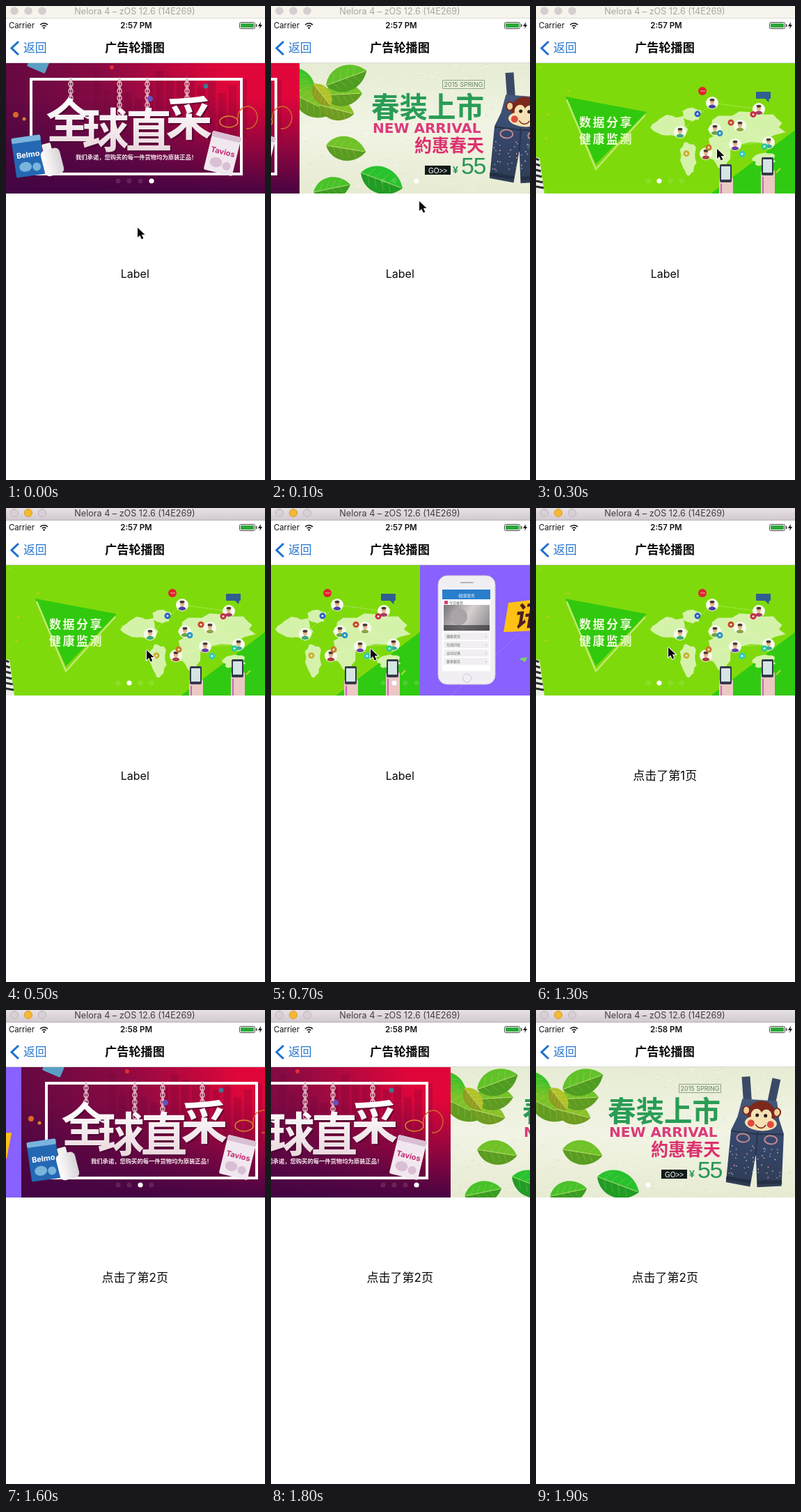
These frames come from a looping animation (372 px wide and 680 px high, 2 s). An HTML page with a canvas:

```html
<!DOCTYPE html>
<html lang="zh-CN">
<head>
<meta charset="utf-8">
<title>广告轮播图</title>
<style>
html, body { margin: 0; width: 100%; height: 100%; overflow: hidden; background: #fff; }
canvas { display: block; }
</style>
</head>
<body>
<canvas id="stage" width="372" height="680"></canvas>
<script>
const ctx = document.getElementById('stage').getContext('2d');
const W = 372, TOP = 82, H = 187, BOTTOM = TOP + H;
const LOOP = 2000, STEP = 100, SLIDE = 120;
const CJK = '"Noto Sans CJK SC", "Noto Sans CJK", sans-serif';
const SANS = 'Inter, ' + CJK;
const ARIAL = '"Liberation Sans", sans-serif';

// Each swipe advances the carousel by one page.
const SWIPES = [20, 150, 671, 780, 880, 1180, 1400, 1509, 1780];
const TAPS = [[800, 3], [1100, 1], [1400, 2]];
const POINTER = [[0, 189, 318], [300, 260, 205], [700, 143, 202], [1000, 190, 200]];

const clamp = v => Math.min(1, Math.max(0, v));
const easeOut = u => 1 - (1 - u) ** 2;
const pageAt = t => SWIPES.reduce((page, s) => page + easeOut(clamp((t - s) / SLIDE)), 3);

function pointerAt(t) {
  const i = POINTER.findIndex(k => k[0] > t);
  if (i < 0) return POINTER[POINTER.length - 1].slice(1);
  const [t0, x0, y0] = POINTER[i - 1], [t1, x1, y1] = POINTER[i];
  const p = (t - t0) / (t1 - t0);
  return [Math.round(x0 + (x1 - x0) * p), Math.round(y0 + (y1 - y0) * p)];
}

function random(seed) {
  return () => (seed = seed * 16807 % 2147483647) / 2147483647;
}

function box(x, y, w, h, color, r = 0) {
  ctx.fillStyle = color;
  ctx.beginPath();
  ctx.roundRect(x, y, w, h, r);
  ctx.fill();
}

function frame(x, y, w, h, color, width = 1, r = 0) {
  ctx.strokeStyle = color;
  ctx.lineWidth = width;
  ctx.beginPath();
  ctx.roundRect(x, y, w, h, r);
  ctx.stroke();
}

function disc(x, y, r, color, ry = r) {
  ctx.fillStyle = color;
  ctx.beginPath();
  ctx.ellipse(x, y, r, ry, 0, 0, 7);
  ctx.fill();
}

function arc(x, y, r, from, to, color, width = 1, ry = r) {
  ctx.strokeStyle = color;
  ctx.lineWidth = width;
  ctx.beginPath();
  ctx.ellipse(x, y, r, ry, 0, from, to);
  ctx.stroke();
}

function trace(points) {
  ctx.beginPath();
  for (let i = 0; i < points.length; i += 2) ctx.lineTo(points[i], points[i + 1]);
}

function poly(points, color) {
  trace(points);
  ctx.fillStyle = color;
  ctx.fill();
}

function line(points, color, width = 1) {
  trace(points);
  ctx.strokeStyle = color;
  ctx.lineWidth = width;
  ctx.stroke();
}

function text(str, x, y, font, color, align = 'left', spacing = 0) {
  ctx.font = font;
  ctx.textAlign = align;
  ctx.letterSpacing = spacing + 'px';
  ctx.fillStyle = color;
  ctx.fillText(str, x, y);
}

function gradient(x0, y0, x1, y1, ...colors) {
  const g = ctx.createLinearGradient(x0, y0, x1, y1);
  colors.forEach((c, i) => g.addColorStop(i / (colors.length - 1), c));
  return g;
}

function at(x, y, angle, draw) {
  ctx.save();
  ctx.translate(x, y);
  ctx.rotate(angle);
  draw();
  ctx.restore();
}

function mirrored(draw) {
  for (const side of [-1, 1]) {
    ctx.save();
    ctx.scale(side, 1);
    draw();
    ctx.restore();
  }
}

function leaf(x, y, length, angle, hue) {
  const bulge = length * .4;
  at(x, y, angle, () => {
    for (const side of [-1, 1]) {
      ctx.fillStyle = `hsl(${hue}, 65%, ${side < 0 ? 46 : 37}%)`;
      ctx.beginPath();
      ctx.moveTo(0, 0);
      ctx.bezierCurveTo(length * .2, side * bulge, length * .75, side * bulge, length, 0);
      ctx.fill();
    }
    line([0, 0, length * .95, 0], 'rgba(225,240,140,.6)');
    for (let s = length / 6; s < length * .75; s += length / 6) {
      line([s + 7, -bulge * .5, s, 0, s + 7, bulge * .5], 'rgba(225,240,140,.3)', .7);
    }
  });
}

function spring() {
  box(0, TOP, W, H, gradient(0, TOP, 0, BOTTOM, '#e6ecd3', '#f1f4e4', '#e7ebd2'));
  const rnd = random(71);
  for (let i = 0; i < 260; i++) {
    box(rnd() * W, TOP + rnd() * H, 1 + rnd() * 6, 1, i % 2 ? 'rgba(190,195,145,.25)' : 'rgba(255,255,250,.5)');
  }
  for (let i = 0; i < 4; i++) leaf(-8, 88 + i * 13, 62, 1.2 - i * .25, 112 - i * 8);
  for (let i = 0; i < 3; i++) leaf(28 + i * 5, 142 - i * 14, 52 + i * 5, .25 - i * .3, 82 + i * 8);
  leaf(20, 112, 40, .9, 66);
  leaf(38, 200, 58, .16, 92);
  leaf(88, 239, 64, .36, 122);
  leaf(20, 267, 54, -.2, 108);

  frame(205.5, 106.5, 60, 12, '#8ba58b');
  text('2015 SPRING', 235.5, 116, '9px Inter, sans-serif', '#668667', 'center');
  text('春装上市', 103, 160, '900 40.5px ' + CJK, '#2a9c56');
  text('NEW ARRIVAL', 105, 182, 'bold 20px "DejaVu Sans", sans-serif', '#dc3a7a');
  text('約惠春天', 165, 209, '900 25px ' + CJK, '#dc316f');
  box(180, 229, 37, 13, '#111b18');
  text('GO>>', 198.5, 239.5, '10px ' + ARIAL, '#fff', 'center');
  text('¥', 220, 240, 'bold 14px ' + ARIAL, '#299557');
  text('55', 232, 241, '34px ' + ARIAL, '#299557', 'left', -1.5);
  at(318, 175, .07, overalls);
}

function overalls() {
  const rnd = random(19);
  mirrored(() => {
    line([22, -78, 17, -42], '#3a4a66', 12);
    poly([0, -46, 25, -46, 30, -20, 38, 0, 40, 75, 5, 79, 0, 32], gradient(0, -46, 0, 79, '#44587a', '#35466a', '#2f3c54'));
    line([0, 3, 37, 1], '#26354a', 2);
    line([5, 72, 40, 69], '#232f44', 5);
    arc(20, 10, 9, 0, 7, '#c48a91', 2, 6);
    for (let i = 0; i < 24; i++) disc(3 + rnd() * 34, 20 + rnd() * 46, .9, i % 3 ? '#8fa3bc' : '#e6a0aa');
  });
  line([0, 0, 0, 34], '#26354a', 2);
  at(4, -23, 0, monkey);
}

function monkey() {
  disc(0, -3, 20, '#7d281d', 19);
  disc(0, 10, 23, '#f5e1b3', 11);
  mirrored(() => {
    disc(22, -7, 6, '#7d281d', 7);
    disc(22, -7, 4, '#efd09a', 5);
    disc(7, -1, 8, '#f5e1b3', 9);
    disc(14, 11, 5, '#df4b40');
    disc(6, -1, 2.5, '#241b1b');
  });
  arc(0, 9, 8, .4, 2.7, '#7d281d', 1.5);
}

// A ragged ellipse standing in for a landmass.
function land(x, y, rx, ry, seed) {
  const rnd = random(seed), points = [];
  for (let a = 0; a < 6.28; a += .3) {
    const k = .8 + rnd() * .35;
    points.push(x + Math.cos(a) * rx * k, y + Math.sin(a) * ry * k);
  }
  poly(points, '#d5f2ab');
}

function avatar(x, y, r, coat) {
  disc(x, y, r, '#f6fbea');
  ctx.save();
  ctx.beginPath();
  ctx.arc(x, y, r - 1, 0, 7);
  ctx.clip();
  disc(x, y + r * .85, r * .65, coat, r * .6);
  disc(x, y - r * .2, r * .35, '#e7b58f', r * .42);
  disc(x, y - r * .48, r * .38, '#4a3a34', r * .22);
  ctx.restore();
}

function handset(x, y) {
  box(x - 1, y + 18, 20, BOTTOM - y, '#ecc8c4', 4);
  line([x + 2, y + 28, x + 2, BOTTOM], '#cc64c0', 2);
  box(x, y, 17, 26, '#353a4c', 2);
  box(x + 2, y + 3, 13, 19, '#d5e5e4');
}

function green() {
  box(0, TOP, W, H, '#7fda0c');
  poly([250, 270, 372, 178, 372, 270], '#31ca12');
  poly([42, 130, 159, 152, 86, 227], '#31c90e');
  line([44, 134, 86, 234, 157, 156], '#bfea73', 2.5);
  ['数据分享', '健康监测'].forEach((row, i) =>
    text(row, 62, 173 + i * 24, 'bold 17px ' + CJK, '#f1fbdc', 'left', 2.5));

  land(193, 172, 26, 16, 5);
  land(224, 155, 15, 10, 8);
  land(219, 218, 12, 25, 12);
  land(304, 174, 56, 23, 20);
  land(265, 204, 18, 29, 31);
  land(328, 220, 16, 10, 44);

  const people = [[207, 181], [253, 139], [320, 148], [293, 172], [334, 196], [286, 199], [244, 212], [257, 177]];
  ctx.setLineDash([1, 2]);
  line(people.flat(), '#eefacf');
  ctx.setLineDash([]);
  people.forEach(([x, y], i) => avatar(x, y, 9, `hsl(${i * 95 + 150}, 45%, 45%)`));
  for (let i = 0; i < 8; i++) {
    const x = 216 + i * 16, y = 184 + 30 * Math.cos(i * 2.5 + .4);
    disc(x, y, 4.5, `hsl(${i * 170 + 50}, 65%, 48%)`);
    disc(x, y, 1.5, '#e8eddb');
  }
  disc(239, 122, 6, '#dd2430');
  line([236, 122, 243, 122], '#ffb4a5');
  box(316, 123, 21, 10, '#315e91', 1);
  poly([329, 133, 335, 133, 334, 138], '#315e91');
  handset(264, 227);
  handset(324, 217);

  poly([0, 217, 5, 218, 12, 269, 0, 269], '#eeeee9');
  for (let y = 219; y < 267; y += 8) line([0, y, 4 + (y - 217) / 6, y + 2], '#252d2a', 3);
  const rnd = random(7);
  for (let i = 0; i < 4; i++) disc(5 + rnd() * 45, 88 + i * 34, 1.2, '#d5c92d');
  line([345, 239, 351, 233], '#c0d72c', 2);
}

function violet() {
  box(0, TOP, W, H, '#8861ff');
  ctx.setLineDash([2, 2]);
  line([45, 269, 145, 178], '#ad91ff');
  ctx.setLineDash([]);

  box(26, 97, 82, 156, '#f2eff4', 13);
  frame(26, 97, 82, 156, '#cbc5d5', 1, 13);
  box(58, 106, 19, 2, '#b7b2bb', 1);
  arc(67.5, 244, 6, 0, 7, '#c7c2ca');
  box(32, 117, 69, 117, '#fff');
  box(32, 117, 69, 14, '#287ecb');
  text('健康服务', 67, 128, '6px ' + CJK, '#e2f0ff', 'center');
  box(35, 133, 5, 5, '#df3d76');
  text('今日推荐', 42, 138, '5px ' + CJK, '#666');
  box(34, 139, 66, 37, gradient(34, 139, 100, 176, '#77747c', '#d6d0cf', '#88848a'));
  disc(56, 156, 12, '#aaa4a8');
  box(34, 168, 66, 8, 'rgba(50,48,54,.65)');
  ['健康资讯', '在线问答', '运动记录', '更多服务'].forEach((name, i) => {
    const y = 184 + i * 12;
    box(34, y - 5, 65, 10, '#f1eff1');
    text(name, 38, y + 2, '5px ' + CJK, '#666');
    text('›', 94, y + 2, '6px ' + SANS, '#999');
  });

  poly([127, 136, 340, 108, 346, 168, 120, 178], '#ffc116');
  poly([178, 181, 358, 176, 351, 213, 171, 218], '#ffc116');
  at(135, 171, -.08, () => text('讯息随身达', 0, 0, 'italic 900 40px ' + CJK, '#4b2022'));
  at(192, 210, -.02, () => text('健康轻松管理', 0, 0, 'bold 24px ' + CJK, '#4b2022'));
  poly([142, 216, 154, 214, 151, 221], '#79d85d');
}

function chain(x, bottom) {
  for (let y = 82, i = 0; y < bottom; y += 5, i++) {
    if (y > 103) arc(x, y, i % 2 ? 1 : 3, 0, 7, '#dcb8c2', 1.5, 4);
  }
}

// A tilted package with a printed name, centred on x, y.
function pack(x, y, angle, body, lid, name, ink) {
  at(x, y, angle, () => {
    box(-21, -28, 42, 57, body, 2);
    box(-21, -28, 42, 8, lid, 2);
    text(name, 0, 2, 'bold 11px ' + SANS, ink, 'center');
    disc(-6, 15, 9, lid, 7);
    disc(10, 17, 6, lid);
  });
}

function purple() {
  box(0, TOP, W, H, gradient(0, 190, 310, 82, '#5d0842', '#8a0a43', '#e0063a'));
  box(0, TOP, W, H, gradient(0, 130, 0, BOTTOM, 'rgba(66,4,67,0)', 'rgba(65,4,67,.95)'));
  const rnd = random(43);
  for (let x = 125; x < 340; x += 15) {
    const y = 92 + rnd() * 45;
    box(x, y, 11, 190 - y, 'rgba(100,5,55,.23)');
  }
  frame(36, 105, 302, 136, '#fff', 4);

  const headline = [['全', 91, 189], ['球', 143, 203], ['直', 205, 203], ['采', 263, 186]];
  headline.forEach(([, x, y], i) => chain([93, 163, 203, 260][i], y - 50));
  ctx.shadowColor = 'rgba(65,0,45,.65)';
  ctx.shadowOffsetX = ctx.shadowOffsetY = 2;
  const ink = gradient(0, 135, 0, 207, '#fff', '#ead9de');
  for (const [char, x, y] of headline) text(char, x, y, '900 67px ' + CJK, ink, 'center');
  ctx.shadowColor = 'transparent';
  text('我们承诺，您购买的每一件货物均为原装正品！', 100, 220, 'bold 8.3px ' + CJK, '#f6e9ef');

  at(45, 86, .4, () => box(-14, -16, 28, 22, '#5aa0c4', 2));
  pack(32, 215, -.14, '#2468b4', '#79b4dc', 'Belmo', '#fff');
  at(65, 218, -.25, () => {
    box(-9, -22, 13, 13, '#f3f0ee', 2);
    box(-14, -13, 28, 38, gradient(-14, 0, 14, 0, '#fff', '#d8d3d6'), 7);
  });
  pack(311, 211, .24, '#f1e8ef', '#d9bfd4', 'Tavios', '#c32c73');

  arc(320, 166, 13, 0, 7, '#d98b2d', 1.5, 8);
  arc(347, 160, 14, 3, 8, '#cb6a2b', 1.5, 16);
  disc(14, 156, 4, '#d66a24');
  disc(26, 162, 2.5, '#d38431');
  disc(152, 88, 3, '#e42d31');
  disc(207, 133, 4, '#654fc2');
  disc(287, 115, 3.5, '#407895');
}

const BANNERS = [spring, green, violet, purple];

function carousel(page) {
  const first = Math.floor(page), shift = Math.round((page - first) * W);
  ctx.save();
  ctx.beginPath();
  ctx.rect(0, TOP, W, H);
  ctx.clip();
  for (const i of [0, 1]) {
    ctx.save();
    ctx.translate(i * W - shift, 0);
    ctx.beginPath();
    ctx.rect(0, TOP, W, H);
    ctx.clip();
    BANNERS[(first + i) % 4]();
    ctx.restore();
  }
  for (let i = 0; i < 4; i++) {
    disc(161 + i * 16, 251, 3.6, i === first % 4 ? '#fff' : 'rgba(255,255,255,.12)');
  }
  ctx.restore();
}

function windowBar(active) {
  box(0, 0, W, 17, active ? gradient(0, 0, 0, 17, '#e7e0e6', '#d2cad1') : '#f6f4ec');
  box(0, 17, W, 1, active ? '#b9b1b8' : '#dedbd3');
  for (let i = 0; i < 3; i++) {
    const yellow = active && i === 1, x = 12 + i * 20;
    disc(x, 7, 5.8, yellow ? '#f6b935' : active ? '#d9d0d7' : '#d5cdd0');
    if (active) arc(x, 7, 5.5, 0, 7, yellow ? '#d99b25' : '#beb4bc');
  }
  text('Nelora 4 – zOS 12.6 (14E269)', 185, 12, '12.6px ' + SANS, active ? '#403c40' : '#aaa5a2', 'center');
}

function header(time) {
  text('Carrier', 4, 32, '11.3px ' + SANS, '#111');
  for (const r of [4, 7.3]) arc(54.5, 32, r, -2.4, -.74, '#111', 1.6);
  disc(54.5, 31.5, 1.3, '#111');
  text(time, 187, 32, '600 11.5px ' + SANS, '#111', 'center');
  frame(335.5, 23.5, 22, 9, '#444', 1, 2);
  box(337, 25, 19, 6, '#2da83a', 1);
  box(359, 26, 1.5, 4, '#444');
  poly([366, 23, 362, 29, 365, 29, 364, 33, 368, 27, 365.5, 27], '#111');

  line([18, 51, 8, 60.5, 18, 70], '#1c70ce', 3);
  text('返回', 25, 66, '16.8px ' + CJK, '#2876cd');
  text('广告轮播图', 185, 66, 'bold 17.2px ' + CJK, '#080808', 'center');
  box(0, 81, W, 1, '#d9d9d9');
}

function pointer(x, y) {
  at(x, y, 0, () => {
    const arrow = [0, 0, 0, 14, 3.3, 11, 5.7, 16.5, 8.3, 15.4, 6, 10, 10.5, 10, 0, 0];
    line(arrow, '#fff', 2);
    poly(arrow, '#080808');
  });
}

function draw(t) {
  box(0, 0, W, 680, '#fff');
  windowBar(t >= 500);
  header(t < 1500 ? '2:57 PM' : '2:58 PM');
  carousel(pageAt(t));
  const tap = TAPS.filter(k => k[0] <= t).pop();
  text(tap ? `点击了第${tap[1]}页` : 'Label', 185.3, 389.5, (tap ? 17 : 16) + 'px ' + SANS, '#080808', 'center');
  if (t < 1500) pointer(...pointerAt(t));
}

const start = performance.now();
function tick() {
  const t = (performance.now() - start) % LOOP;
  draw(Math.floor(t / STEP) * STEP);
  requestAnimationFrame(tick);
}
tick();
</script>
</body>
</html>
```
